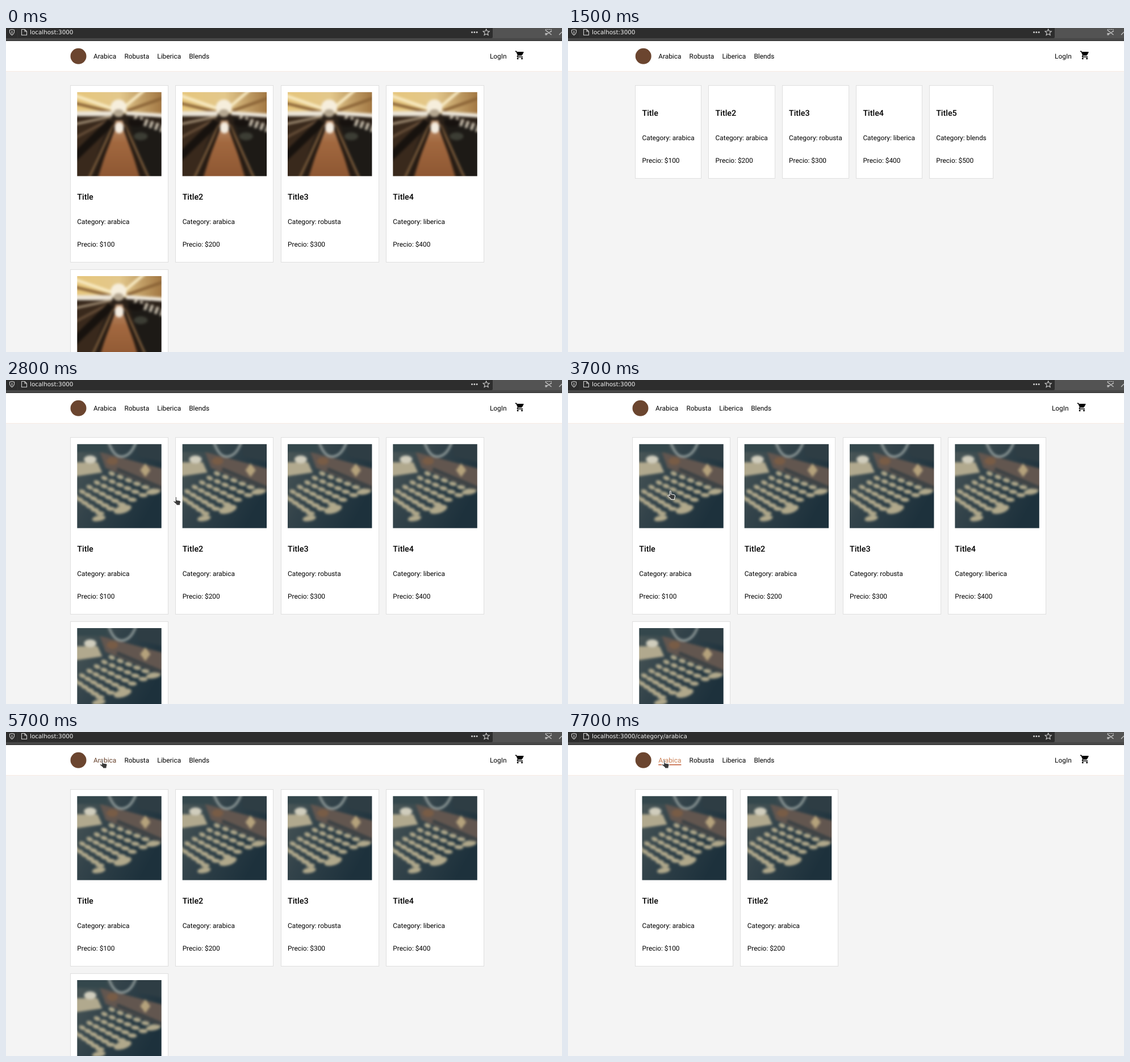
Animation, 979 px wide and 572 px high, one loop 8 s. Source, as an HTML page:

```html
<!DOCTYPE html>
<html lang="en">
<head>
<meta charset="utf-8">
<title>Coffee shop</title>
<style>
  html, body { margin: 0; width: 100%; height: 100%; overflow: hidden; background: #f4f4f4; }
  svg { display: block; width: 979px; height: 572px; text-rendering: geometricPrecision; }
  text { font: 11.867px Roboto, sans-serif; white-space: pre; }
  .title { font-size: 14.3px; font-weight: 500; }
  .url { font: 10.38px "DejaVu Sans", sans-serif; fill: #f4f4f4; }
  .icon { fill: none; stroke: #d0d0d0; stroke-width: 1.1; }
  .card { fill: #fff; stroke: #dfdfdf; }
</style>
</head>
<body>
<svg viewBox="0 0 979 572">
  <defs>
    <clipPath id="square"><rect width="148.4" height="148.4"/></clipPath>
    <filter id="soft" x="-5%" y="-5%" width="110%" height="110%" color-interpolation-filters="sRGB">
      <feGaussianBlur stdDeviation="2.2"/>
    </filter>
    <linearGradient id="ceiling">
      <stop offset=".1" stop-color="#e6c67c"/><stop offset=".5" stop-color="#e3c88c"/><stop offset=".9" stop-color="#a07541"/>
    </linearGradient>
    <linearGradient id="aisle" x2="0" y2="1">
      <stop stop-color="#c09572"/><stop offset=".35" stop-color="#a2683f"/><stop offset="1" stop-color="#8a5430"/>
    </linearGradient>
    <linearGradient id="desk" x2=".9" y2=".5">
      <stop stop-color="#55605d"/><stop offset=".5" stop-color="#33434a"/><stop offset="1" stop-color="#1d313c"/>
    </linearGradient>

    <g id="corridor" clip-path="url(#square)"><g filter="url(#soft)">
      <rect x="-20" y="-20" width="190" height="190" fill="#2a2018"/>
      <path d="M-20-20H170V42L86 38H60L-20 36Z" fill="url(#ceiling)"/>
      <path d="M-10 18 60 35M158 8 88 33" stroke="#8a6336" stroke-width="5"/>
      <path d="M-10 4 62 29M120-5 86 24" stroke="#f8ebc4" stroke-width="5"/>
      <path d="M-10 46 60 39 18 160H-10Z" fill="#39291c"/>
      <path d="M-10 38 62 38" stroke="#ebe4d6" stroke-width="9"/>
      <path d="M-10 58 60 43" stroke="#a08d74" stroke-width="4"/>
      <path d="M-10 84 58 48" stroke="#69503a" stroke-width="4"/>
      <path d="M-10 120 60 52" stroke="#17120e" stroke-width="14"/>
      <path d="M88 44 160 66V160H126Z" fill="#1d1a16"/>
      <path d="M86 37 160 42" stroke="#ece5d8" stroke-width="7"/>
      <path d="M100 46 160 68" stroke="#c9bfae" stroke-width="13" stroke-dasharray="5 5"/>
      <ellipse cx="104" cy="54" rx="14" ry="7" fill="#17120f"/>
      <ellipse cx="112" cy="78" rx="12" ry="7" fill="#3c3d34"/>
      <circle cx="73" cy="27" r="14" fill="#f6eedc"/>
      <ellipse cx="73" cy="37" rx="9" ry="7" fill="#b5a791"/>
      <path d="M68 50H80L113 160H34Z" fill="url(#aisle)"/>
      <path d="M64 58 17 160M84 58 130 160" stroke="#8c6842" stroke-width="3"/>
      <path d="M66 60 28 160M82 60 119 160" stroke="#251a12" stroke-width="5"/>
      <ellipse cx="74" cy="63" rx="8" ry="10" fill="#f4ece0"/>
    </g></g>

    <g id="typewriter" clip-path="url(#square)"><g filter="url(#soft)">
      <rect x="-20" y="-20" width="190" height="190" fill="url(#desk)"/>
      <path d="M40 14 160 46V86L50 42Z" fill="#62564f"/>
      <path d="M100-10H160V34L108 22Z" fill="#2e3d44"/>
      <path d="M55-5Q64 24 80 22T104-5" fill="none" stroke="#8f9a99" stroke-width="4"/>
      <path d="M-10-10H52V14H-10Z" fill="#34474c"/>
      <path d="M-10 32H36L44 50-10 58Z" fill="#b1a98e"/>
      <ellipse cx="23" cy="27" rx="11" ry="7" fill="#d0cdbd"/>
      <ellipse cx="62" cy="30" rx="10" ry="7" fill="#785c46"/>
      <path d="M70 44 150 78" stroke="#3a4144" stroke-width="6"/>
      <path d="M120 34 129 46 120 58 111 46Z" fill="#b5a27c"/>
      <g id="keys" fill="#b0a88b"></g>
    </g></g>
  </defs>

  <rect width="979" height="572" fill="#f4f4f4"/>
  <g id="browser">
    <rect width="979" height="23" fill="#484848"/>
    <rect x="857" width="122" height="18" fill="#535353"/>
    <path d="M0 0H857V15Q857 18 854 18H0Z" fill="#2d2d2d"/>
    <path d="M0 22.5H979" stroke="#2a2a2a"/>
    <path d="M20.5 0V18" stroke="#343434"/>
    <path class="icon" d="M6.5 3.5 10.5 2.5 14.5 3.5V7Q14 10.5 10.5 12.5 7 10.5 6.5 7ZM10.5 5V10"/>
    <path class="icon" d="M27.5 2.5H33L36.5 6V12.5H27.5ZM33 2.5V6H36.5"/>
    <text id="url" class="url" x="42" y="11"></text>
    <path d="M820.5 7.5h.01m4.3 0h.01m4.3 0h.01" stroke="#d0d0d0" stroke-width="3" stroke-linecap="round"/>
    <path class="icon" d="M845.6 2 847.2 5.6 851.2 6 848.2 8.7 849.1 12.7 845.6 10.6 842.1 12.7 843 8.7 840 6 844 5.6Z"/>
    <path class="icon" d="M950 2.5H960V7" stroke-dasharray="2 1"/>
    <path class="icon" d="M949.5 3.5 960.5 12M960.5 5.5 951 11.5M950 9.5h2v2.5h-2zM974 12 979 7"/>
  </g>

  <rect y="23" width="979" height="53" fill="#fff"/>
  <path d="M0 76.5H979" stroke="#f8eae3"/>
  <g id="header">
    <circle cx="127.5" cy="49.8" r="14" fill="#6b452f"/>
    <text id="arabica" x="154" y="54">Arabica</text>
    <rect id="underline" x="154" y="57" width="40.2" fill="#c4623e"/>
    <text x="208.4" y="54">Robusta</text>
    <text x="266.3" y="54">Liberica</text>
    <text x="322.2" y="54">Blends</text>
    <text x="851.9" y="54">LogIn</text>
    <path transform="translate(895.9 39.1) scale(.7417)" d="M7 18c-1.1 0-2 .9-2 2s.9 2 2 2 2-.9 2-2-.9-2-2-2zM1 2v2h2l3.6 7.6-1.35 2.44C4.5 15.4 5.5 17 7 17h12v-2H7.42a.25.25 0 01-.22-.37l.9-1.63h7.45c.75 0 1.41-.41 1.75-1.03l3.58-6.49A1 1 0 0020 4H5.21l-.94-2zM17 18c-1.1 0-2 .9-2 2s.9 2 2 2 2-.9 2-2-.9-2-2-2z"/>
  </g>

  <g id="scenes"></g>
  <path id="arrow" d="M937.5 107.5V120L940.2 117.6 942 121.6 943.8 120.8 942.2 117H945.8Z" fill="#333" stroke="#fff" stroke-width=".7"/>
  <path id="hand" d="M4.2 2Q4.2.8 5.2.8T6.3 2V6.4L12 7.5Q13.7 8 13.5 9.8L12.5 13.2V15.6H6V14L1 9.8Q.3 8.6 1.6 8.1L4.2 9Z" fill="#3b3b3b" stroke="#fff"/>
</svg>

<script>
const LOOP = 8000;
const SHIFT = 5.2;            // the page is centred wider while there is no scrollbar
const IMAGE = 148.3, PITCH = 185.35, ROW = 324.7;
const $ = id => document.getElementById(id);
const products = ['arabica', 'arabica', 'robusta', 'liberica', 'blends'].map((category, i) => ({
  title: 'Title' + (i ? i + 1 : ''), category, price: (i + 1) * 100
}));

// Keyboard: rows running down to the right, plus three larger keys
const key = (x, y, rx, ry, tilt) => `<ellipse rx="${rx}" ry="${ry}" transform="translate(${x} ${y}) rotate(${tilt})"/>`;
let keys = key(80, 115, 16, 7, -17) + key(38, 131, 12, 5, -10) + key(134, 84, 13, 5, -8);
for (let row = 0; row < 6; row++) {
  for (let k = 0; k < 6; k++) {
    const f = k / 5;
    keys += key(-4 + 13 * row + (44 + 6 * row) * f, 92 - 8 * row + 30 * f, 6 + f * 2, 3.8, 22 - 18 * f);
  }
}
$('keys').innerHTML = keys;

function card({ title, category, price }, x, y, width, photo) {
  const textX = x + 12.4, offset = photo ? IMAGE : 0;
  const left = Math.round(x) + .5, top = Math.round(y) + .5;
  const line = (dy, text, cls = '') => `<text class="${cls}" x="${textX}" y="${y + dy + offset}">${text}</text>`;
  return `<rect class="card" x="${left}" y="${top}" width="${Math.round(x + width) - left - .5}" height="${Math.round(163.5 + offset)}"/>`
    + (photo ? `<use href="#${photo}" x="${textX}" y="${y + 12.3}"/>` : '')
    + line(54, title, 'title') + line(97.2, `Category: ${category}`) + line(137.2, `Precio: $${price}`);
}
const photoCards = (list, photo, shift) => list.map((p, i) =>
  card(p, 112.9 + shift + i % 4 * PITCH, 100.9 + (i >> 2) * ROW, 173, photo)).join('');

const narrowX = [118.1, 247.2, 376.6, 507, 635.8, 761.2];
const narrowCards = products.map((p, i) =>
  card(p, narrowX[i], 100.9, narrowX[i + 1] - narrowX[i] - 12, null)).join('');

const scenes = [
  { start: 0, shift: 0, html: photoCards(products, 'corridor', 0) },
  { start: 500, shift: SHIFT, html: '' },
  { start: 1500, shift: SHIFT, html: narrowCards },
  { start: 2800, shift: 0, html: photoCards(products, 'typewriter', 0) },
  { start: 7700, shift: SHIFT, html: photoCards(products.slice(0, 2), 'typewriter', SHIFT) }
];
$('scenes').innerHTML = scenes.map(s => `<g>${s.html}</g>`).join('');
const groups = [...$('scenes').children];

// Pointer path: time, x, y
const path = [
  [2600, 520, 125], [2700, 390, 171.5], [2800, 294, 205.5], [2900, 238, 221], [3100, 189, 233],
  [3300, 175, 236], [3400, 175, 236], [3900, 175, 168], [4000, 175, 168], [4100, 166, 167],
  [4800, 166, 167], [4900, 166, 149.5], [5300, 169, 88], [5700, 164.5, 48.5]
];
function pointerAt(t) {
  const next = path.findIndex(p => p[0] > t);
  if (next < 0) return path.at(-1).slice(1);
  const [t0, x0, y0] = path[next - 1], [t1, x1, y1] = path[next];
  const f = (t - t0) / (t1 - t0);
  return [x0 + (x1 - x0) * f, y0 + (y1 - y0) * f];
}

const show = (el, on) => el.style.display = on ? '' : 'none';

function render(now) {
  const t = Math.floor(now % LOOP / 100) * 100;
  const scene = scenes.findLastIndex(s => s.start <= t);
  groups.forEach((g, i) => show(g, i === scene));
  $('header').setAttribute('transform', `translate(${scenes[scene].shift})`);

  $('url').textContent = 'localhost:3000' + (t >= 6700 ? '/category/arabica' : '');
  const hover = Math.min(1, Math.max(0, (t - 5600) / 200));
  $('arabica').setAttribute('fill', `rgb(${200 * hover} ${124 * hover} ${80 * hover})`);
  $('underline').setAttribute('height', t < 6700 ? 0 : t < 6900 ? 1 : 1.6);

  show($('arrow'), t === 1800);
  show($('hand'), t >= 2600);
  if (t >= 2600) $('hand').setAttribute('transform', `translate(${pointerAt(t)})`);
}

function frame() {
  render(performance.now());
  requestAnimationFrame(frame);
}
frame();
</script>
</body>
</html>
```
